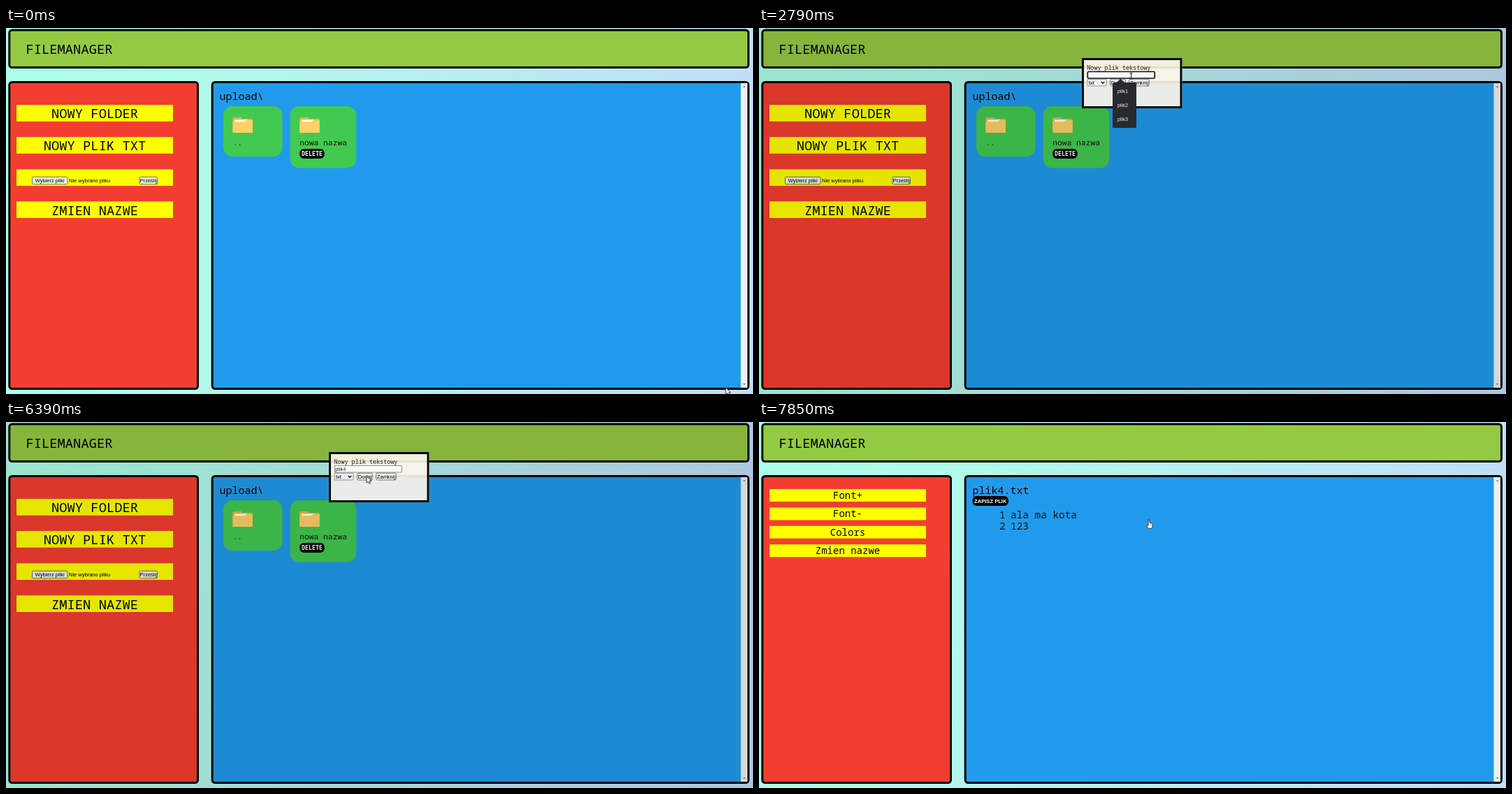
Animation, 1069 px wide and 524 px high, one loop 8000 ms. Source, as an HTML page with a canvas:

```html
<!DOCTYPE html>
<html lang="pl">
<head>
<meta charset="utf-8">
<title>Filemanager</title>
<style>
  html, body { margin: 0; width: 100%; height: 100%; overflow: hidden; }
  canvas { display: block; }
</style>
</head>
<body>
<canvas id="stage" width="1069" height="524"></canvas>
<script>
const ctx = document.getElementById('stage').getContext('2d');
const LOOP = 8000, FPS = 15;
const MONO = '"Noto Sans Mono", monospace';
const SANS = '"Liberation Sans", sans-serif';

// Moments below are counted in ticks of 1/15 s.
const OPEN = 18, SUGGEST = 34, UNSUGGEST = 85, BLUR = 96, ADDED = 97, EDITOR = 116;
const KEYS = [[55, 'p'], [58, 'l'], [63, 'i'], [66, 'k'], [80, '4']];
const BLINK = 8;

// Pointer stops: tick, x, y
const PATH = [
  [0, 1030, 515], [8, 270, 130], [11, 174.5, 169],
  [22, 174.5, 169], [27, 549, 64], [30, 536, 65],
  [33, 536, 65], [36, 532.5, 68.5],
  [75, 532.5, 68.5], [77, 535, 68.5],
  [80, 535, 68.5], [82, 532.5, 68.5],
  [84, 532.5, 68.5], [95, 516, 77.5],
  [104, 516, 77.5], [111, 558, 140]
];

function box(x, y, w, h, fill, r = 0, stroke, line = 1) {
  ctx.beginPath();
  ctx.roundRect(x, y, w, h, r);
  if (fill) { ctx.fillStyle = fill; ctx.fill(); }
  if (stroke) { ctx.strokeStyle = stroke; ctx.lineWidth = line; ctx.stroke(); }
}

function text(str, x, y, font, color = '#000', align = 'left') {
  ctx.font = font;
  ctx.fillStyle = color;
  ctx.textAlign = align;
  ctx.fillText(str, x, y);
}

function shape(points, fill, stroke, line = 1) {
  ctx.beginPath();
  points.forEach(([x, y]) => ctx.lineTo(x, y));
  ctx.closePath();
  if (fill) { ctx.fillStyle = fill; ctx.fill(); }
  if (stroke) { ctx.strokeStyle = stroke; ctx.lineWidth = line; ctx.stroke(); }
}

function at(x, y, draw) {
  ctx.save();
  ctx.translate(x, y);
  draw();
  ctx.restore();
}

function panel(x, y, right, bottom, fill) {
  box(x + 1.5, y + 1.5, right - x - 3, bottom - y - 3, fill, 4, '#000', 3);
}

function button(label, x, y, w, h = 10.5) {
  box(x, y, w, h, '#efefef', 1.5, '#666', 0.9);
  text(label, x + w / 2, y + h / 2 + 2.7, '7.5px ' + SANS, '#000', 'center');
}

function pill(label, x, y, w, font) {
  box(x, y, w, 14, '#000', 6);
  text(label, x + w / 2, y + 9.9, font, '#fff', 'center');
}

function bars(labels, y, pitch, h, font, drop) {
  labels.forEach((label, i) => {
    box(15, y + i * pitch, 224, h, '#ff0');
    if (label) text(label, 127, y + i * pitch + drop, font, '#000', 'center');
  });
}

function drawFrame() {
  const sky = ctx.createLinearGradient(0, 0, 1069, 200);
  sky.addColorStop(0, '#abffe8');
  sky.addColorStop(0.25, '#b0fbea');
  sky.addColorStop(1, '#c1def8');
  box(0, 0, 1069, 524, sky);
  panel(3.3, 1.5, 1064, 58, '#94ca42');
  panel(3.3, 76, 276, 518, '#f23e30');
  panel(293.7, 76, 1064, 518, '#209bec');
  box(1051.5, 79, 9.5, 436, '#f0f0f0');
  shape([[1054.5, 85], [1056.5, 83], [1058.5, 85]], '#777');
  shape([[1054.5, 509], [1056.5, 511], [1058.5, 509]], '#777');
  text('FILEMANAGER', 28.5, 37.3, '500 18.8px ' + MONO);
}

function folder(x, y) {
  at(x, y, () => {
    box(0, 0, 13, 10, '#f0b440', 1.5);
    box(0, 2, 28.5, 19, '#f0b440', 1.5);
    box(2.5, 3.2, 18, 3.5, '#fff');
    shape([[0, 6.5], [16, 6.5], [19.5, 4], [28.5, 4], [28.5, 22], [0, 22]], '#ffd066');
  });
}

function textFile(x, y) {
  at(x, y, () => {
    shape([[1.2, 1.2], [15, 1.2], [21.8, 8], [21.8, 27], [1.2, 27]], null, '#000', 2.2);
    shape([[14, 1], [14, 9], [22, 9]], '#000');
    [13, 17.5, 22].forEach((line, i) => box(4.5, line, i < 2 ? 14 : 10, 1.8, '#000'));
  });
}

function card(name, x, w, h, color, deletable, file) {
  const nameY = file ? 170 : 168;
  box(x, 112, w, h, color, 13);
  if (file) textFile(x + 39, 125); else folder(x + 13.5, 128);
  text(name, x + 13.5, nameY, '11.3px ' + MONO, '#111');
  if (deletable) pill('DELETE', x + 13.5, nameY + 5, 35.5, 'bold 8.3px "DejaVu Sans Mono", monospace');
}

function drawFiles(hasNewFile) {
  bars(['NOWY FOLDER', 'NOWY PLIK TXT', '', 'ZMIEN NAZWE'], 110, 46.1, 23.7, '500 18.8px ' + MONO, 19.2);
  button('Wybierz pliki', 37.5, 213.2, 50.5);
  text('Nie wybrano pliku', 90, 221.3, '7.5px ' + SANS);
  button('Prześlij', 191, 213.2, 25.5);
  text('upload\\', 305.5, 103, '500 15px ' + MONO);
  card('..', 311, 84.5, 72, '#42ca50');
  card('nowa nazwa', 406.7, 94.5, 88.5, '#42ca50', true);
  if (hasNewFile) card('plik4.txt', 512.3, 100, 90, '#c84141', true, true);
}

function drawEditor() {
  bars(['Font+', 'Font-', 'Colors', 'Zmien nazwe'], 96, 26.4, 18, '500 14px ' + MONO, 14);
  text('plik4.txt', 305.5, 103, '500 15px ' + MONO);
  pill('ZAPISZ PLIK', 305.5, 106, 51.5, 'bold 7.6px ' + SANS);
  ['ala ma kota', '123'].forEach((line, i) => {
    text(i + 1, 344, 137.5 + i * 16, '14.4px ' + MONO, '#111');
    text(line, 360, 137.5 + i * 16, '14.4px ' + MONO, '#111');
  });
}

function drawDialog(tick) {
  const typed = KEYS.filter(([when]) => tick >= when);
  const value = typed.map(([, key]) => key).join('');
  const lastInput = typed.length ? typed[typed.length - 1][0] : OPEN;
  const focused = tick < BLUR;

  box(0, 0, 1069, 524, 'rgba(0,0,0,.1)');
  box(462, 43, 143.5, 72, 'rgba(255,247,236,.9)');
  box(463.5, 44.5, 140.5, 69, null, 0, '#080706', 3);
  text('Nowy plik tekstowy', 469.3, 60, '8.45px ' + MONO, '#222');
  box(470.3, 62.5, 96, 9.5, '#fafafa', focused ? 1.5 : 0, focused ? '#111' : '#777', focused ? 1.7 : 0.8);
  text(value, 471.2, 69.7, '7.4px ' + SANS, '#222');
  if (focused && Math.floor((tick - lastInput) / BLINK) % 2 === 0)
    box(471 + ctx.measureText(value).width, 63.5, 0.9, 8, '#000');

  box(470, 73.3, 27, 9.7, '#efefef', 1, '#777', 0.8);
  text('txt', 472, 81, '7.5px ' + SANS);
  ctx.beginPath();
  ctx.moveTo(489.7, 77);
  ctx.lineTo(492, 79.3);
  ctx.lineTo(494.3, 77);
  ctx.strokeStyle = '#111';
  ctx.lineWidth = 1.3;
  ctx.stroke();
  button('Dodaj', 502.7, 73.2, 21.8, 9.8);
  button('Zamknij', 529.7, 73.2, 28.6, 9.8);

  if (tick >= SUGGEST && tick < UNSUGGEST) {
    ctx.globalAlpha = Math.min(1, (tick - SUGGEST + 1) / 3);
    box(506, 78, 34, 65, '#292a2d', 2);
    shape([[511.5, 78.5], [517.5, 72.5], [523.5, 78.5]], '#292a2d');
    [1, 2, 3].forEach(n => text('plik' + n, 513, 72.4 + n * 20.3, '7.3px ' + SANS, '#f0f0f0'));
    ctx.globalAlpha = 1;
  }
}

function pointerAt(tick) {
  const next = PATH.findIndex(([when]) => when > tick);
  if (next < 0) return PATH[PATH.length - 1].slice(1);
  const [t0, x0, y0] = PATH[next - 1], [t1, x1, y1] = PATH[next];
  const u = (tick - t0) / (t1 - t0), ease = u * u * (3 - 2 * u);
  return [x0 + (x1 - x0) * ease, y0 + (y1 - y0) * ease];
}

const pointers = {
  arrow() {
    shape([[0, 0], [0, 9.5], [2.2, 7.5], [4, 11], [5.6, 10.2], [4, 7], [7, 7]], '#fff', '#111', 0.8);
  },
  beam() {
    box(-0.5, -4, 1, 8.5, '#222');
    box(-2, -4.5, 4, 0.9, '#222');
    box(-2, 4, 4, 0.9, '#222');
  },
  hand() {
    shape([[-0.8, 0], [0.8, 0], [1.1, 4], [4, 4.7], [5.2, 6], [5, 9.5], [3.8, 12.5],
           [-0.6, 12.5], [-3.3, 8.5], [-2.7, 7.3], [-0.9, 8.4]], '#fff', '#222', 0.8);
    box(1.2, 5, 0.5, 2.5, '#444');
    box(3, 5.5, 0.5, 2.3, '#444');
  }
};

function drawPointer(tick) {
  const [x, y] = pointerAt(tick);
  const inside = (l, t, r, b) => x > l && x < r && y > t && y < b;
  let kind = 'arrow';
  if (tick >= OPEN && tick < ADDED && inside(470, 62, 567, 72.5)) kind = 'beam';
  if (tick >= ADDED && inside(512, 112, 612, 202)) kind = 'hand';
  at(x, y, pointers[kind]);
}

function render(now) {
  // Times are rounded to 10 ms, so a tick may begin slightly early.
  const tick = Math.floor((now % LOOP) * FPS / 1000 + 0.25);
  drawFrame();
  if (tick >= EDITOR) drawEditor();
  else drawFiles(tick >= ADDED);
  if (tick >= OPEN && tick < ADDED) drawDialog(tick);
  drawPointer(tick);
}

const start = performance.now();
function loop() {
  render(performance.now() - start);
  requestAnimationFrame(loop);
}
loop();
</script>
</body>
</html>
```
